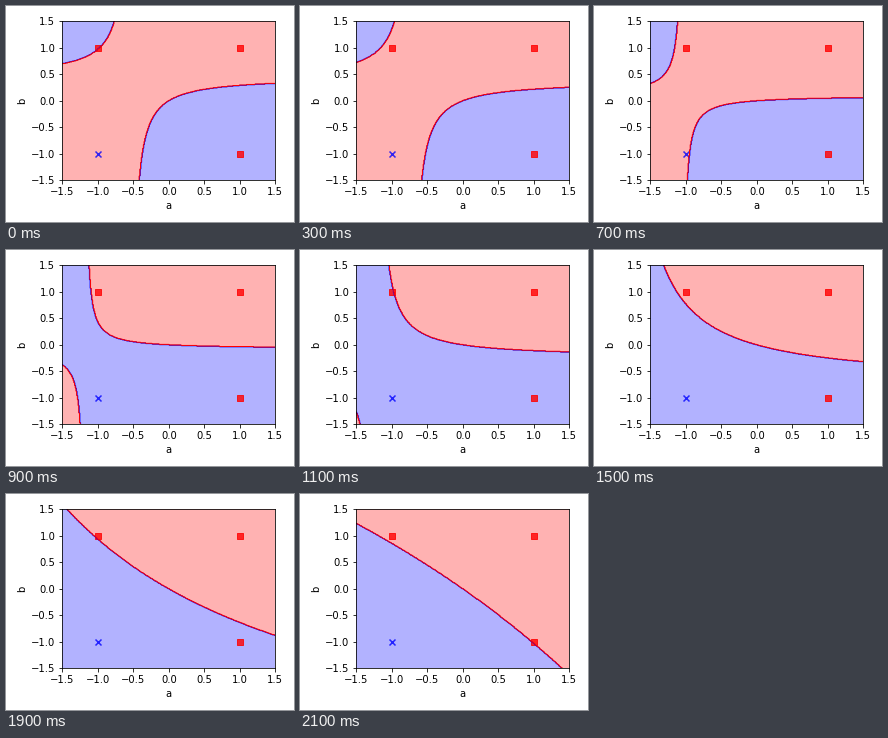
A matplotlib script for the animation above (2.2 s loop, 288x216 px).

```python
import numpy as np
import matplotlib.pyplot as plt
from matplotlib.animation import FuncAnimation

W, H, DPI = 288, 216, 72
STEPS, INTERVAL = 22, 100
LIM = 1.5

points = np.array([[-1, -1], [-1, 1], [1, -1], [1, 1]])
labels = np.array([-1, 1, 1, 1])


def features(a, b):
    return np.array([a, b, a * b])


def train(w, steps):
    """Batch perceptron: every misclassified point pulls the weights."""
    x = features(*points.T).T
    history = [w]
    for _ in range(steps - 1):
        wrong = labels * (x @ w) <= 0
        w = w + (labels[wrong, None] * x[wrong]).sum(axis=0)
        history.append(w)
    return history


weights = train(np.array([-14.8, 17.85, 33.1]), STEPS)

axis = np.linspace(-LIM, LIM, 301)
grid_a, grid_b = np.meshgrid(axis, axis)
grid = features(grid_a, grid_b)

fig, ax = plt.subplots(figsize=(W / DPI, H / DPI), dpi=DPI)
fig.subplots_adjust(left=56.3 / W, right=269.2 / W,
                    bottom=1 - 174.4 / H, top=1 - 15.2 / H)
ax.set_xlim(-LIM, LIM)
ax.set_ylim(-LIM, LIM)
ticks = np.arange(-LIM, LIM + 0.1, 0.5)
ax.set_xticks(ticks)
ax.set_yticks(ticks)
ax.set_xlabel("a")
ax.set_ylabel("b")

for label, color, marker in ((1, "red", "s"), (-1, "blue", "x")):
    a, b = points[labels == label].T
    ax.scatter(a, b, c=color, marker=marker, alpha=0.8, zorder=1.5)

regions = []


def draw(step):
    while regions:
        regions.pop().remove()
    side = np.where(np.tensordot(weights[step], grid, 1) > 0, 1, -1)
    regions.append(ax.contourf(axis, axis, side, levels=[-2, 0, 2],
                               colors=["blue", "red"], alpha=0.3, zorder=1))
    regions.append(ax.contour(axis, axis, side, levels=[-0.6, 0.6],
                              colors=["blue", "red"], linewidths=1,
                              linestyles="solid", zorder=2))
    return regions


anim = FuncAnimation(fig, draw, frames=STEPS, init_func=lambda: [],
                     interval=INTERVAL, repeat=True, repeat_delay=0, blit=False)
plt.show()
```
